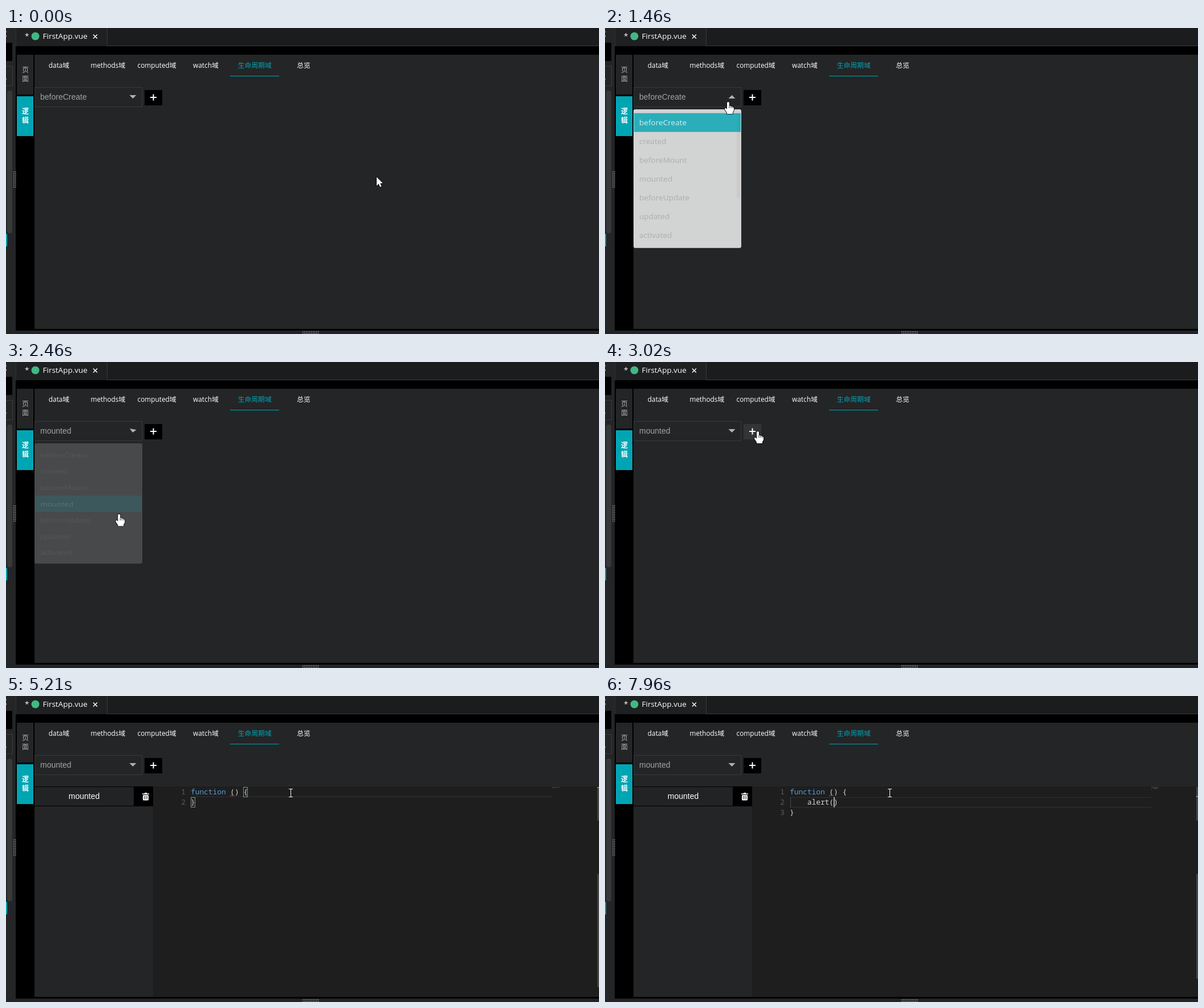
These frames come from a looping animation (1040x538 px, 8 s). An HTML page with a canvas:

```html
<!DOCTYPE html>
<html lang="zh">
<head>
<meta charset="utf-8">
<style>
html, body { margin: 0; width: 100%; height: 100%; overflow: hidden; background: #000; }
canvas { display: block; }
</style>
</head>
<body>
<canvas id="stage" width="1040" height="538"></canvas>
<script>
const g = document.getElementById('stage').getContext('2d');
const LOOP = 8000, TEAL = '#00a5b3', PANEL = '#242527', CH = 7.7, LINE = 18.15;
const UI = '"Open Sans", "Noto Sans CJK SC", "Noto Sans CJK", sans-serif';
const ARIAL = '14px "Liberation Sans", sans-serif';
const MONO = '12.83px "Noto Sans Mono", monospace';
const HOOKS = ['beforeCreate', 'created', 'beforeMount', 'mounted', 'beforeUpdate', 'updated', 'activated'];
const HINTS = [['k', 'abstract'], ['m', 'addEventListener'], ['m', 'alert'], ['k', 'any'],
  ['v', 'applicationCache'], ['v', 'arguments'], ['k', 'as'], ['k', 'async'], ['m', 'atob'],
  ['k', 'await'], ['p', 'AAGUID'], ['i', 'AbstractWorker']];
// pointer waypoints: time, x, y
const PATH = [[0, 650, 262], [310, 650, 262], [500, 560, 240], [680, 420, 212], [850, 330, 185],
  [980, 260, 152], [1090, 216, 130], [1500, 216, 130], [1700, 200, 162], [1870, 189, 178],
  [1930, 189, 182], [1990, 189, 205], [2070, 189, 270], [2430, 189, 270], [2600, 240, 256],
  [2720, 275, 228], [2830, 286, 185], [2930, 283, 150], [3020, 268, 122], [3170, 268, 122],
  [3230, 262, 123], [3980, 262, 123], [4150, 300, 142], [4350, 390, 182], [4550, 470, 178],
  [4700, 499, 171], [LOOP, 499, 171]];

const clamp = v => Math.max(0, Math.min(1, v));
const ease = v => 1 - (1 - clamp(v)) ** 2;

function box(x, y, w, h, fill) { g.fillStyle = fill; g.fillRect(x, y, w, h); }
function frame(x, y, w, h, color) {
  g.strokeStyle = color; g.lineWidth = 1; g.strokeRect(x + .5, y + .5, w - 1, h - 1);
}
function round(x, y, w, h, r, fill) {
  g.fillStyle = fill; g.beginPath(); g.roundRect(x, y, w, h, r); g.fill();
}
function text(s, x, y, font, fill, align = 'left') {
  g.font = font; g.fillStyle = fill; g.textAlign = align; g.fillText(s, x, y);
}
function line(color, width, ...p) {
  g.strokeStyle = color; g.lineWidth = width; g.beginPath();
  for (let i = 0; i < p.length; i += 2) g.lineTo(p[i], p[i + 1]);
  g.stroke();
}
function at(x, y, draw) { g.save(); g.translate(x, y); draw(); g.restore(); }

function pointer(t) {
  const i = Math.max(1, PATH.findIndex(p => p[0] > t)), a = PATH[i - 1], b = PATH[i];
  const u = (t - a[0]) / (b[0] - a[0]);
  return [a[1] + (b[1] - a[1]) * u, a[2] + (b[2] - a[2]) * u];
}

function shell() {
  box(0, 0, 1040, 538, '#000');
  box(0, 0, 1040, 32, '#1b1c1e');
  box(0, 0, 17, 538, PANEL);
  box(18, 0, 159, 32, '#1f2022');
  box(177, 31, 863, 1, '#3a3b3d');
  box(177, 0, 1, 32, '#3a3b3d');
  box(17, 0, 1, 32, '#303133');
  box(0, 532, 1040, 6, '#242426');
  text('X', -6, 15, '13px ' + UI, '#fff');
  box(0, 26, 11, 32, '#000');
  frame(-5, 67, 17, 35, '#3a3b3d');
  box(0, 89, 1, 2, '#999');
  round(2, 110, 9, 251, 4, '#37383a');
  box(0, 362, 2, 22, TEAL);
  for (let i = 0; i < 10; i++) {
    for (let j = 0; j < 2; j++) {
      box(13 + j * 3, 252 + i * 3, 1.5, 1.5, '#8a8b8d');
      box(520 + i * 3, 533 + j * 3, 1.5, 1.5, '#8a8b8d');
    }
  }
  text('*', 33, 19, '13.5px ' + UI, '#fff');
  g.fillStyle = '#41b883'; g.beginPath(); g.arc(51.5, 14.5, 7, 0, 7); g.fill();
  text('FirstApp.vue', 64.5, 19, '13.5px ' + UI, '#fff');
  line('#fff', 1.5, 153, 11.5, 160, 18.5);
  line('#fff', 1.5, 160, 11.5, 153, 18.5);

  box(19, 47, 29, 70, PANEL);
  box(19, 120, 29, 70, TEAL);
  [...'页面'].forEach((c, i) => text(c, 34, 78 + i * 16, '12px ' + UI, '#b0b1b2', 'center'));
  [...'逻辑'].forEach((c, i) => text(c, 34, 151 + i * 16, 'bold 12px ' + UI, '#fff', 'center'));
  box(50, 47, 990, 482, PANEL);
  ['data域', 'methods域', 'computed域', 'watch域', '生命周期域', '总览'].forEach((s, i) =>
    text(s, 93 + i * 85.8, 70, '11.8px ' + UI, i == 4 ? TEAL : '#fff', 'center'));
  box(393, 84, 86, 1, TEAL);
}

function picker(t) {
  frame(50, 104, 189, 35, '#38393b');
  text(t < 2310 ? 'beforeCreate' : 'mounted', 60, 126, ARIAL, '#a2a3a5');
  const turn = ease((t - 1240) / 200) - ease((t - 2310) / 200);
  at(222.5, 121, () => {
    g.rotate(Math.PI * turn);
    g.fillStyle = '#b0b1b2'; g.beginPath();
    g.moveTo(-6, -3); g.lineTo(6, -3); g.lineTo(0, 3); g.fill();
  });
  const over = t >= 2970 && t < 4070, down = t >= 3510 && t < 3560;
  box(243, 109, 31, 27, down ? '#222325' : over ? '#333436' : '#000');
  box(253, 121, 11, 2, '#fff');
  box(257.5, 116.5, 2, 11, '#fff');
}

function dropdown(t, y) {
  const show = ease((t - 1340) / 220) - ease((t - 2330) / 220);
  if (show <= 0) return;
  const chosen = t < 2310 ? 0 : 3, hover = Math.floor((y - 150) / 34.4);
  g.save();
  g.globalAlpha = show;
  g.translate(0, 143); g.scale(1, .8 + .2 * show); g.translate(0, -143);
  round(50, 143, 189, 254, 3, '#fff');
  HOOKS.forEach((s, i) => {
    const top = 150 + i * 34.4;
    if (i == chosen) box(51, top, 187, 34.4, TEAL);
    else if (i == hover && t > 1900 && t < 2450) box(51, top, 187, 34.4, '#f3f3f3');
    text(s, 60, top + 22.5, '13.6px ' + UI, i == chosen ? '#fff' : '#a3a4a5');
  });
  round(231, 150, 6, 156, 3, 'rgba(90,70,60,.07)');
  g.restore();
}

function icon(kind, x, y) {
  at(x, y, () => {
    if (kind == 'k') {
      for (let i = 0; i < 4; i++) {
        const gap = [7, 5, 8, 6][i];
        box(0, i * 3, gap - 1, 1.4, '#c5c5c5');
        box(gap + 1, i * 3, 11 - gap, 1.4, '#c5c5c5');
      }
    } else if (kind == 'm') {
      line('#b180d7', 1.1, 6, -1, 11, 2, 11, 8, 6, 11, 1, 8, 1, 2, 6, -1);
      line('#b180d7', 1.1, 1, 2, 6, 5, 11, 2);
      line('#b180d7', 1.1, 6, 5, 6, 11);
    } else if (kind == 'v') {
      line('#c5c5c5', 1.1, 2.5, 1, .5, 1, .5, 9, 2.5, 9);
      line('#c5c5c5', 1.1, 9.5, 1, 11.5, 1, 11.5, 9, 9.5, 9);
      round(3, 3, 6, 5, 2, '#75beff');
    } else if (kind == 'p') {
      line('#c5c5c5', 2.6, 1, 10, 7, 4);
      g.lineWidth = 2.2; g.beginPath(); g.arc(8.5, 2.5, 2.5, -.3, 4.2); g.stroke();
    } else {
      line('#75beff', 1.3, 3, 5, 7, 5);
      round(0, 3, 4, 4, 2, '#75beff');
      g.lineWidth = 1.5; g.beginPath(); g.arc(9, 5, 2.3, 0, 7); g.stroke();
    }
  });
}

function hints() {
  box(378, 196, 410, 217, '#2c2c2f');
  frame(378, 196, 410, 217, '#454548');
  box(379, 197, 408, 18, '#073655');
  HINTS.forEach(([kind, s], i) => {
    const y = 210 + i * 18.13;
    icon(kind, 382, y - 9.5);
    text(s[0], 399, y, MONO, '#0097fb');
    text(s.slice(1), 399 + CH, y, MONO, '#d4d4d4');
  });
}

function editor(t) {
  box(50, 159, 208, 35, '#000');
  box(50, 160, 174, 33, '#222325');
  text('mounted', 137, 181, ARIAL, '#fff', 'center');
  box(243, 170, 4, 2, '#fff');
  box(239, 171.5, 12, 1.5, '#fff');
  round(240, 174, 10, 9.5, 1.5, '#fff');
  for (const x of [242, 244.5, 247]) box(x, 175.5, 1, 6, '#333');
  box(258, 159, 782, 370, '#1e1e1e');

  const typed = t < 6080 ? '' : t < 6730 ? 'a' : t < 7190 ? 'ale' : t < 7960 ? 'alert' : 'alert()';
  const split = t >= 5650, focus = t >= 4700;
  const lines = split ? ['function () {', '    ' + typed, '}'] : ['function () {', '}'];
  const row = split ? 1 : 0, top = 159.5 + row * LINE;
  if (focus) {
    if (split) box(324, 178, 634, 1, '#303030');
    box(324, split ? 195 : 176.5, 634, 1.2, '#303030');
  }
  if (typed) box(325, 178, 1, 18, '#454545');
  if (focus && !split) {
    for (const [x, y] of [[416, 160], [324, 178]]) {
      box(x, y, 8, 18, 'rgba(0,100,0,.1)');
      frame(x, y, 8, 18, '#888');
    }
  }
  lines.forEach((s, i) => {
    const y = 173 + i * LINE;
    text(i + 1, 315, y, MONO, '#5a5a5a', 'right');
    const key = i ? 0 : 8;
    text(s.slice(0, key), 324, y, MONO, '#569cd6');
    text(s.slice(key), 324 + key * CH, y, MONO, '#d4d4d4');
    // minimap: one dot per character
    [...s].forEach((c, k) => {
      if (c != ' ') box(958 + k, 160 + i * 2, 1, 1, k < key ? '#34536b' : '#5c5c5c');
    });
  });
  const wave = [];
  for (let i = 0; i < 5; i++) wave.push(393 + i * 1.9, 176 - i % 2 * 2);
  line('#e03c3c', 1, ...wave);

  const blinkOff = t >= 5210 && t < 5650 || t >= 7720 && t < 7960;
  if (focus && !blinkOff) {
    const col = split ? 4 + (t < 7960 ? typed.length : 6) : 13;
    box(Math.round(324 + col * CH), top, 1.6, 18, '#c8c8c6');
  }
  box(1037, 160, 3, 59, '#434343');
  if (focus) {
    box(1037, 313, 3, split ? 184 : 199, '#434343');
    box(1037, split ? 176 : 160, 3, 1.5, '#a0a0a0');
  }
  if (t >= 6730 && t < 7190) hints();
}

const ARROW = new Path2D('M0 0V15.5L3.6 12L6 17.5L8.6 16.4L6.2 11H11Z');
const HAND = new Path2D('M-2 1Q0-1 2 1V7Q4 6 5 8Q7 7 8 9Q10 8.500 10 11V15L8 18V21H-2V19L-6 13Q-6 10-3.500 11L-2 13Z');

function cursor(t, x, y) {
  const hand = y < 139 && x < 239 || t > 1560 && t < 2500 && x < 239 || y < 136 && x > 243 && x < 274;
  at(x, y, () => {
    if (t >= 3750 && x > 258 && y > 159) {
      const beam = (color, w) => {
        line(color, w, .5, -7, .5, 6);
        line(color, w, -3, -7.5, 4, -7.5);
        line(color, w, -3, 6.5, 4, 6.5);
      };
      beam('#000', 3);
      beam('#fff', 1.2);
      return;
    }
    const shape = hand ? HAND : ARROW;
    g.strokeStyle = '#000'; g.lineWidth = 1.6; g.lineJoin = 'round'; g.stroke(shape);
    g.fillStyle = '#fff'; g.fill(shape);
    if (hand) {
      line('#000', .9, 2, 7, 2, 11);
      line('#000', .9, 5, 8, 5, 11);
      line('#000', .9, 8, 9, 8, 11);
    }
  });
}

function draw(now) {
  const t = now % LOOP, [x, y] = pointer(t);
  shell();
  picker(t);
  if (t >= 3750) editor(t);
  dropdown(t, y);
  cursor(t, x, y);
}

const start = performance.now();
function tick() {
  draw(performance.now() - start);
  requestAnimationFrame(tick);
}
tick();
</script>
</body>
</html>
```
